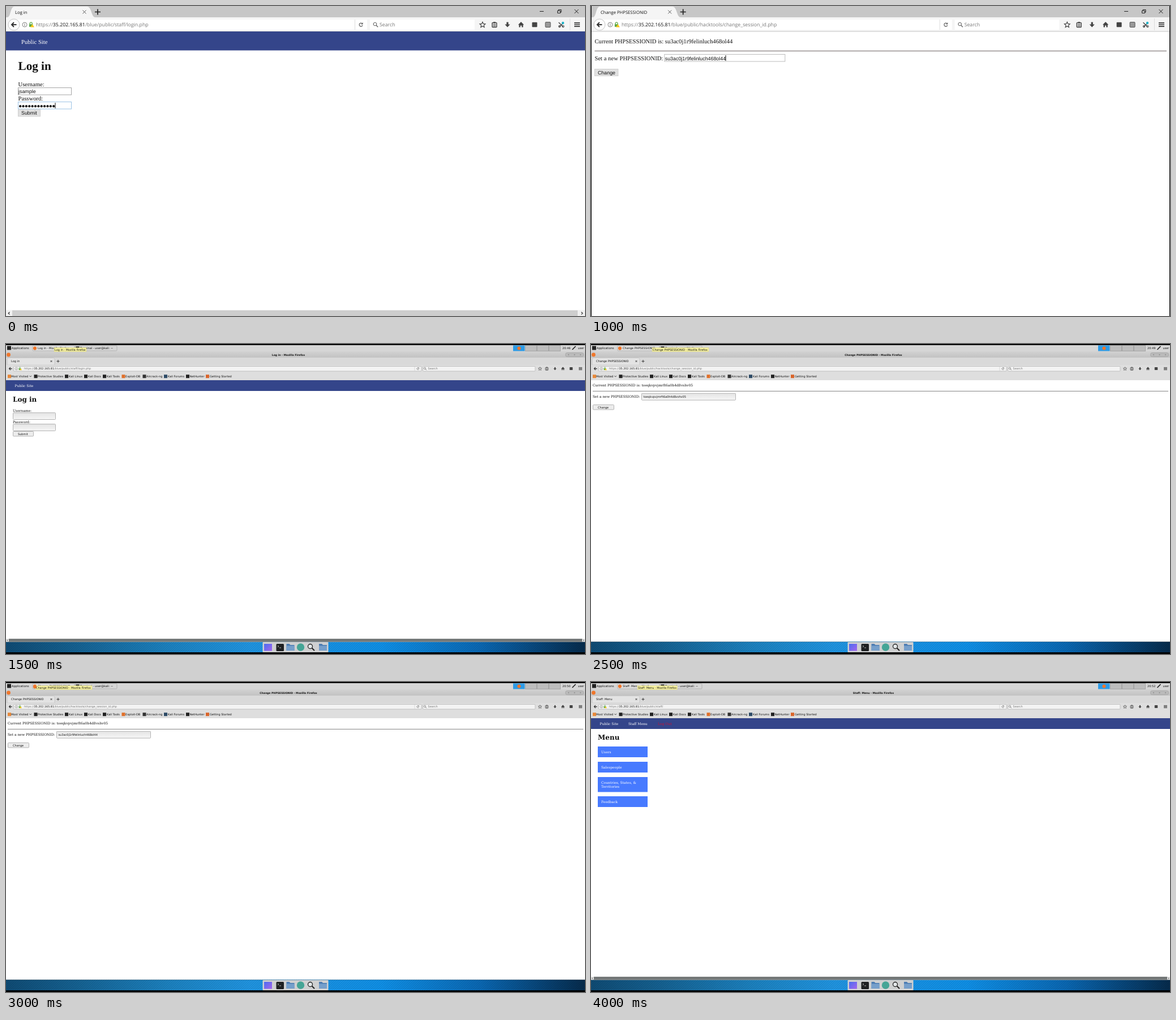
These frames come from a looping animation (1023x548 px, 4.5 s). An HTML page:

```html
<!DOCTYPE html>
<html lang="en">
<head>
<meta charset="utf-8">
<title>Session change</title>
<style>
html, body { margin: 0; width: 100%; height: 100%; overflow: hidden; background: #fff; }
svg { display: block; width: 1023px; height: 4932px; animation: play 4.5s steps(9) infinite; }
@keyframes play { to { transform: translateY(-4932px); } }
text { white-space: pre; text-rendering: geometricPrecision; fill: #111; }
.tab { font: 7.7px "Open Sans", sans-serif; }
.url { font: 8.75px "Open Sans", sans-serif; }
.times { font: 10.67px "Liberation Serif", serif; }
.times.h { font-size: 21.2px; font-weight: bold; }
.arial { font: 8.9px "Liberation Sans", sans-serif; }
.sans { font: 5px "DejaVu Sans", sans-serif; }
.addr { font: 4.87px "DejaVu Sans", sans-serif; }
.cap { font: bold 4.55px "DejaVu Sans", sans-serif; text-anchor: middle; }
.serif { font: 6px "DejaVu Serif", serif; }
.serif.h { font-size: 12px; font-weight: bold; }
text.w { fill: #fff; }
text.out { fill: #d01030; }
text.dim, .dim { fill: #777; }
.host { fill: #111; }
</style>
</head>
<body>
<script>
const W = 1023, H = 548;
const HOST = '35.202.165.81';
const OWN_ID = 'toeqkvpvjmrft6a0h4d8vshv05', STOLEN_ID = 'su3ac0j1r9felinluch468ol44';
const LOGIN = '/blue/public/staff/login.php', CHANGE = '/blue/public/hacktools/change_session_id.php';
const NAVY = '#34458a', ORANGE = '#f0762a', INK = '#444';

const box = (x, y, w, h, fill, more = '') =>
  `<rect x="${x}" y="${y}" width="${w}" height="${h}" fill="${fill}" ${more}/>`;
const frame = (x, y, w, h, fill, line, r = 0) =>
  box(x + .5, y + .5, w - 1, h - 1, fill, `stroke="${line}" rx="${r}"`);
const dot = (x, y, r, fill, more = '') => `<circle cx="${x}" cy="${y}" r="${r}" fill="${fill}" ${more}/>`;
const line = (d, color = INK, w = 1) => `<path d="${d}" fill="none" stroke="${color}" stroke-width="${w}"/>`;
const text = (x, y, s, cls, more = '') =>
  `<text x="${x}" y="${y}" class="${cls}" ${more}>${s.replace(/&/g, '&amp;')}</text>`;
const address = (x, y, path, cls) =>
  `<text x="${x}" y="${y}" class="${cls} dim">https://<tspan class="host">${HOST}</tspan>${path}</text>`;

// Toolbar glyphs, each drawn around 0,0 in a box of about 10 units.
const glyphs = {
  back: line('M4.5 0H-4M0 -4L-4 0L0 4', '#333', 2),
  info: dot(0, 0, 4, 'none', 'stroke="#777" stroke-width=".9"') + line('M0 -.8V2.3M0 -2.4V-1.4', '#777', 1.1),
  lock: line('M-2.8 -.5V-2.2A2 2 0 0 1 1.2 -2.2V-.5', '#58a744', 1.3) + box(-4, -.8, 6.3, 4.6, '#58a744') +
    '<path d="M1.5 -1L5 4.5H-2Z" fill="#f5c518"/>',
  reload: line('M2.7 -1.5A3 3 0 1 0 3 1', '#666', 1.2) + '<path d="M3.6 -4V-.4H0Z" fill="#666"/>',
  lens: dot(-1, -1, 2.8, 'none', 'stroke="#666" stroke-width="1.1"') + line('M1 1L4.2 4.2', '#666', 1.4),
  star: line('M0 -4.8L1.5 -1.6L4.9 -1.3L2.3 1.1L3.1 4.6L0 2.8L-3.1 4.6L-2.3 1.1L-4.9 -1.3L-1.5 -1.6Z', INK, 1.2),
  clip: box(-4, -3.5, 8, 8, 'none', 'rx="1" stroke="#444" stroke-width="1.4"') + box(-1.7, -5, 3.4, 2.4, INK) +
    line('M-2.5 -.8H2.5M-2.5 1H2.5M-2.5 2.8H2.5', INK, .9),
  down: '<path d="M-1.6 -4.5H1.6V-.5H4.6L0 4.5L-4.6 -.5H-1.6Z" fill="#444"/>',
  home: '<path d="M0 -5L5.2 .3H3.6V4.6H1.2V1.4H-1.2V4.6H-3.6V.3H-5.2Z" fill="#444"/>',
  pocket: box(-4.5, -4.2, 9, 8.4, INK, 'rx="1"'),
  menu: line('M-5 -3.2H5M-5 0H5M-5 3.2H5', '#333', 1.7),
  cut: line('M-4.5 -4L3.5 4M-3.5 4L2 -1.5', INK, 1.3) + dot(-3, 3, 1.7, 'none', 'stroke="#444"') +
    dot(3.4, 3, 1.7, 'none', 'stroke="#444"') + dot(3, -3, 2.2, '#20b2c8'),
};
const icon = (name, x, y, k = 1) => `<g transform="translate(${x} ${y}) scale(${k})">${glyphs[name]}</g>`;

// k scales the page; top is where it begins.
function menuPage(k, top, cls, links) {
  const tile = (y, h, rows) => box(12 * k, top + y * k, 88 * k, h * k, '#477aff') +
    rows.map((s, i) => text(18 * k, top + (y + 11.5 + 7 * i) * k, s, cls + ' w')).join('');
  return box(0, top, W, 19 * k, NAVY) +
    text(links[0], top + 11.8 * k, 'Public Site', cls + ' w') +
    text(links[1], top + 11.8 * k, 'Staff Menu', cls + ' w') +
    text(links[2], top + 11.8 * k, 'Log Out', cls + ' out') +
    text(12 * k, top + 38.2 * k, 'Menu', cls + ' h') +
    tile(50, 19, ['Users']) + tile(77, 19, ['Salespeople']) +
    tile(104, 26.5, ['Countries, States, &', 'Territories']) + tile(138, 19, ['Feedback']);
}

// First computer
function winBrowser(title, path, page) {
  return box(0, 0, W, H, '#fff') + box(0, 0, W, 20, '#c6c6c6') + box(0, 20, W, 25, '#f5f5f5') +
    '<path d="M2 20C9 20 7 1 15 1H143C152 1 150 20 158 20Z" fill="#f5f5f5"/>' +
    text(16, 13.6, title, 'tab') +
    line('M135.5 7.5L141.5 13.5M141.5 7.5L135.5 13.5', '#555') +
    line('M157 10.5H167M162 5.5V15.5', '#222', 1.7) +
    line('M943 9.5H950M1004.5 6L1011.5 13M1011.5 6L1004.5 13', '#222') +
    line('M974.5 8.5H979.5V12.5H974.5ZM976 8V6.5H981V11H980', '#222') +
    box(14, 24, 624, 18, '#fff') + box(643, 24, 185, 18, '#fff') +
    line('M616.5 24V42M996.5 22V43', '#ddd') + line('M0 45H1023', '#c4c4c4') +
    dot(14, 33, 10, '#fdfdfd', 'stroke="#c4c4c4"') +
    icon('back', 14, 33) + icon('info', 33, 33) + icon('lock', 45, 33) +
    address(53, 36.4, path, 'url') + icon('reload', 627, 33) + icon('lens', 653, 33) +
    text(660, 36.4, 'Search', 'url dim', 'font-style="italic"') +
    ['star', 'clip', 'down', 'home', 'pocket'].map((n, i) => icon(n, [842, 863, 886, 910, 934][i], 33)).join('') +
    frame(952.5, 28, 10, 10, '#999', '#555', 1) + icon('cut', 981, 33) + icon('menu', 1009, 33) + page;
}
const winScroll = box(0, 537.5, W, 10.5, '#f0f0f0') + box(11, 538, 999, 10, '#cdcdcd') +
  line('M6.5 541L4.2 543.2L6.5 545.4M1016.5 541L1018.8 543.2L1016.5 545.4', '#333', 1.2);
const winButton = (x, y, w, s) => frame(x, y, w, 13, '#e1e1e1', '#cfcfcf') + text(x + 6, y + 9.6, s, 'arial');

function winLogin() {
  let dots = '';
  for (let i = 0; i < 12; i++) dots += dot(25.2 + 5.36 * i, 177.2, 2.1, '#111');
  return box(0, 45, W, 33.5, NAVY) + text(27, 66.5, 'Public Site', 'times w') +
    text(21.5, 113, 'Log in', 'times h') +
    text(21.5, 142, 'Username:', 'times') + frame(21, 144, 95, 13.5, '#fff', '#a5a5a5') + text(22, 154.3, 'jsample', 'arial') +
    text(21.5, 167, 'Password:', 'times') + frame(21, 169, 95, 13.5, '#fff', '#9cc3e6') + dots +
    line('M87 171V181', '#111') + winButton(21, 182.5, 40, 'Submit') + winScroll;
}
const winChange = () =>
  text(5.5, 66, 'Current PHPSESSIONID is: ' + STOLEN_ID, 'times') + line('M5.5 79.5H1018', '#969090', 1.4) +
  text(5.5, 96, 'Set a new PHPSESSIONID:', 'times') + frame(128.5, 85, 214.5, 13.5, '#fff', '#bbb') +
  text(130, 95.5, STOLEN_ID, 'arial') + line('M237.5 87V97', '#111') + winButton(5, 111, 42.5, 'Change');
const edged = s => box(0, 0, W, H, '#000') + `<g transform="translate(1) scale(.998 1)">${s}</g>`;

// Second computer
const marks = [
  [6, 9, 'Most Visited', '#e8893a'], [52.5, 56, 'Protective Studies', '#222'], [107, 111, 'Kali Linux', '#222'],
  [141, 145, 'Kali Docs', '#222'], [174, 178, 'Kali Tools', '#222'], [207.5, 211, 'Exploit-DB', '#e0702a'],
  [244.5, 248, 'Aircrack-ng', '#333'], [282, 286, 'Kali Forums', '#2c4a66'], [321, 324.5, 'NetHunter', '#222'],
  [356, 360, 'Getting Started', '#d9642a'],
];
const folder = x => `<path d="M${x - 7} 530H${x - 2}L${x} 532H${x + 7}V542H${x - 7}Z" fill="#4d7db3"/>` +
  box(x - 7, 533.5, 14, 8.5, '#769fcb');

const desk = () => box(0, 526.5, W, 18.5, 'url(#sky)') + box(0, 526.5, W, 18.5, 'url(#weave)') +
  box(453.5, 527, 116, 18, '#cfd0d1', 'rx="1"') +
  box(456, 530, 14, 12.5, 'url(#violet)') +
  box(477.5, 530, 13.5, 13, '#1e2022', 'rx="1.5"') + line('M480 533L482 534.5L480 536M483 537H486', '#ddd', .8) +
  folder(502.5) + dot(520.5, 536, 6.7, '#45a596') +
  dot(537.5, 534.5, 4, '#e4e8ea', 'stroke="#222" stroke-width="1.3"') + line('M540.5 537.5L545 542', '#222', 2) +
  folder(560);

function kaliBrowser({ title, path, clock, tip, typed, page }) {
  const full = title + ' - Mozilla Firefox';
  const short = full.length > 24 ? full.slice(0, 19) + '...' : full;
  const [tipX, tipW] = tip;
  return box(0, 0, W, H, '#000') + box(0, 2, W, 11, '#d6d6d6') + box(0, 13, W, 11, 'url(#bar)') +
    box(0, 24, W, 40, '#d9d9d9') + box(0, 64, W, 462.5, '#fff') + desk() +
    // panel
    box(2, 3.5, 7, 7, '#222') + text(10, 9.3, 'Applications', 'sans') +
    frame(46.5, 2.5, 75, 10, '#e0e0e0', '#b2b2b2', 1) + dot(51, 7.6, 3.1, ORANGE) + text(56, 9.3, short, 'sans') +
    frame(121.5, 2.5, 75, 10, '#d6d6d6', '#b2b2b2', 1) + box(123.5, 4.5, 6, 5.5, '#222') +
    text(131, 9.3, 'Terminal - user@kali: ~', 'sans') +
    box(896, 2.5, 20.5, 10, '#2d9be6') + dot(906.5, 7.5, 3.1, ORANGE) +
    [917, 938, 959].map(x => frame(x, 2, 21, 11, '#bdbdbd', '#a6a6a6')).join('') +
    text(983, 9.3, clock, 'sans') + line('M1000.5 10L1006.5 4', '#222', 1.6) + text(1010.5, 9.3, 'user', 'sans') +
    // title and tab
    dot(4.5, 19, 3.4, ORANGE) + text(499, 21.3, full, 'cap') +
    frame(988, 15, 33, 8, '#bababa', '#a9a9a9', 3) +
    [994, 1004.5, 1015].map(x => dot(x, 19, 1, '#8d8d8d')).join('') +
    '<path d="M2 37V27Q2 24.5 5 24.5H83Q86 24.5 86 27V37Z" fill="#e3e3e3" stroke="#bbb" stroke-width=".6"/>' +
    text(9, 32.2, title, 'sans') + line('M78.5 29L81.5 32M81.5 29L78.5 32', '#333', .9) +
    line('M89.5 30.5H94.5M92 28V33', '#333', .9) +
    // address row
    box(0, 37, W, 27, '#dedede') +
    frame(13, 39, 721.5, 9.5, typed ? '#fff' : '#f3f3f3', typed ? '#6ba7dc' : '#c0c0c0', 1) +
    frame(736, 39, 199.5, 9.5, '#f3f3f3', '#c0c0c0', 1) +
    icon('back', 8, 43.6, .6) + `<g opacity="${typed ? .4 : 1}">${icon('info', 18.3, 43.6, .6)}</g>` +
    (typed
      ? text(26, 45.4, 'https://' + HOST + typed, 'addr') + line('M714.5 42.7L716.5 44.7L718.5 42.7M725.5 43.6H730M728.4 42L730 43.6L728.4 45.2', '#555', .8)
      : icon('lock', 25, 43.6, .6) + address(32, 45.4, path, 'addr') + icon('reload', 727.7, 43.6, .6)) +
    line('M722 40V48', '#d0d0d0', .7) + icon('lens', 740.5, 43.6, .6) + text(745.5, 45.4, 'Search', 'sans dim') +
    ['star', 'clip', 'down', 'home', 'pocket', 'menu'].map((n, i) =>
      icon(n, [943.5, 955.5, 970, 984, 998.5, 1015][i], 43.6, .6)).join('') +
    // bookmarks
    marks.map(([x, tx, s, c]) => box(x - 3, 54.2, 6, 6, c) + text(tx, 59.2, s, 'sans')).join('') +
    line('M41.5 56.2L43.2 58L45 56.2', '#333', .9) + page +
    box(tipX, 6.5, tipW, 7, '#f8f3a0', 'stroke="#d6cf80" stroke-width=".5"') + dot(51, 8.5, tipX < 56 ? 3 : 0, ORANGE) +
    text(tipX + 1, 11.8, full, 'sans', 'style="font-size:4.95px"');
}
const kaliScroll = box(0, 521, W, 5.5, '#e6e6e6') + box(5, 521, 1013, 5.5, '#747878') +
  line('M3.2 522.4L1.8 523.8L3.2 525.2M1019.8 522.4L1021.2 523.8L1019.8 525.2', '#333', .8);
const field = (x, y, w) => frame(x, y, w, 13, 'url(#field)', '#b3b3b3', 1);
const button = (x, y, w, s) => frame(x, y, w, 9.5, '#ececec', '#b3b3b3', 1) + text(x + 9, y + 6.6, s, 'sans');

const kaliLogin = () => box(0, 64, W, 19, NAVY) + text(15.5, 75.6, 'Public Site', 'serif w') +
  text(12, 102.2, 'Log in', 'serif h') + text(12, 119.5, 'Username:', 'serif') + field(12, 121, 76) +
  text(12, 139.5, 'Password:', 'serif') + field(12, 141, 76) + button(12, 154, 37, 'Submit') + kaliScroll;
const kaliChange = (now, next) => text(3, 75.3, 'Current PHPSESSIONID is: ' + now, 'serif') +
  line('M3 83.4H1020', '#777', .9) + text(3, 95.3, 'Set a new PHPSESSIONID:', 'serif') +
  field(89, 86.7, 167) + text(92.5, 95.2, next, 'sans') + button(3, 107, 38, 'Change');

const ID_TITLE = 'Change PHPSESSIONID';
const scenes = [
  winBrowser('Log in', LOGIN, winLogin()),
  edged(winBrowser('Staff: Menu', '/blue/public/staff/index.php', menuPage(1.78, 45, 'times', [27, 107, 189]) + winScroll)),
  edged(winBrowser(ID_TITLE, CHANGE, winChange())),
  kaliBrowser({ title: 'Log in', path: LOGIN, clock: '20:46', tip: [85, 57], page: kaliLogin() }),
  kaliBrowser({ title: 'Log in', typed: CHANGE, clock: '20:48', tip: [85, 57], page: kaliLogin() }),
  kaliBrowser({ title: ID_TITLE, path: CHANGE, clock: '20:49', tip: [108, 100], page: kaliChange(OWN_ID, OWN_ID) }),
  kaliBrowser({ title: ID_TITLE, path: CHANGE, clock: '20:50', tip: [52, 100], page: kaliChange(OWN_ID, STOLEN_ID) }),
  kaliBrowser({ title: ID_TITLE, typed: '/blue/public/staff', clock: '20:51', tip: [52, 100], page: kaliChange(STOLEN_ID, STOLEN_ID) }),
  kaliBrowser({ title: 'Staff: Menu', path: '/blue/public/staff/', clock: '20:52', tip: [82, 70.5],
    page: menuPage(1, 64, 'serif', [15.5, 66, 118]) + kaliScroll }),
];

const gradient = (id, dir, stops) => `<linearGradient id="${id}" x2="${dir[0]}" y2="${dir[1]}">` +
  stops.map(([o, c]) => `<stop offset="${o}" stop-color="${c}"/>`).join('') + '</linearGradient>';
document.body.innerHTML = `<svg viewBox="0 0 ${W} ${H * scenes.length}"><defs>` +
  gradient('sky', [1, 0], [[0, '#0f4a72'], [.12, '#15608f'], [.28, '#1c80bd'], [.42, '#2093de'], [.65, '#0f8ee4'], [.82, '#0a66b0'], [1, '#062a4a']]) +
  gradient('bar', [0, 1], [[0, '#d2d2d2'], [1, '#c2c2c2']]) +
  gradient('field', [0, 1], [[0, '#e4e4e4'], [1, '#f6f6f6']]) +
  gradient('violet', [1, 1], [[0, '#4a6cf0'], [1, '#a566ee']]) +
  '<pattern id="weave" width="4" height="4" patternUnits="userSpaceOnUse"><path d="M0 4L4 0" stroke="#012" stroke-opacity=".12"/></pattern></defs>' +
  scenes.map((s, i) => `<g transform="translate(0 ${i * H})">${s}</g>`).join('') + '</svg>';
</script>
</body>
</html>
```
